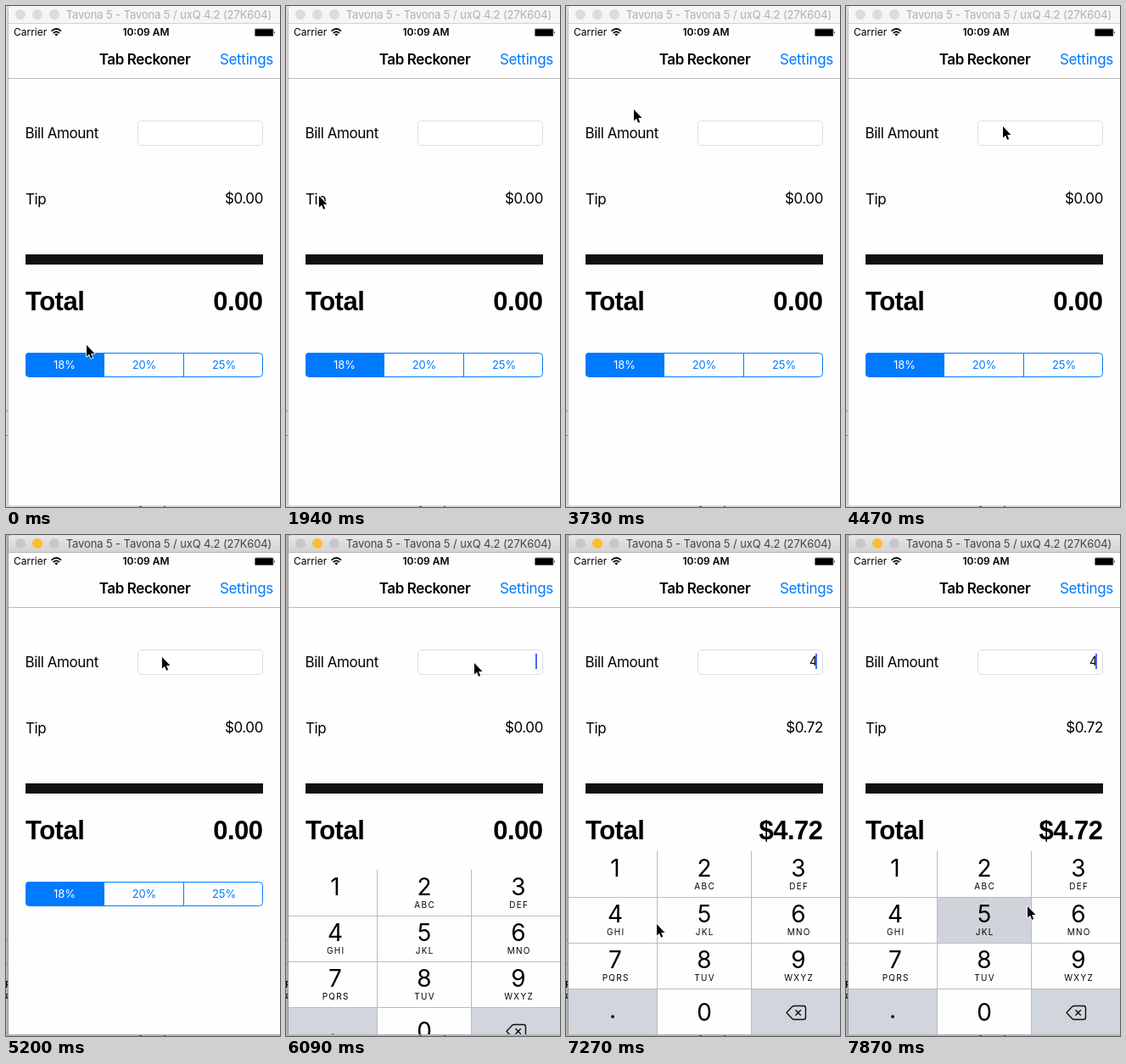
Animation of 323 by 591 pixels, one loop 8000 ms. Source, as an HTML page:

```html
<!DOCTYPE html>
<html lang="en">
<head>
<meta charset="utf-8">
<title>Bill splitter</title>
<style>
  html, body { margin: 0; width: 100%; height: 100%; overflow: hidden; background: #fefefe; }
  svg { display: block; width: 323px; height: 591px; }
  text { font-family: Inter, "Open Sans", sans-serif; fill: #000; white-space: pre; }
  .body { font-size: 17px; letter-spacing: -.4px; }
  .bold { font-weight: 600; }
  .small { font-size: 12px; }
  .total { font: bold 31px "Liberation Sans", Arial, sans-serif; letter-spacing: -.5px; }
  .seg { font-size: 13px; letter-spacing: -.1px; fill: #007aff; }
  .digit { font-size: 28px; }
  .abc { font-size: 10px; letter-spacing: 1.3px; }
  .mid { text-anchor: middle; }
  .end { text-anchor: end; }
  .blue { fill: #007aff; }
</style>
</head>
<body>
<svg viewBox="0 0 323 591">
  <defs>
    <linearGradient id="bar" x1="0" y1="0" x2="0" y2="1">
      <stop offset="0" stop-color="#e8e6e8"/>
      <stop offset="1" stop-color="#d3d1d3"/>
    </linearGradient>
    <clipPath id="screen"><rect x="3" y="21" width="320" height="568"/></clipPath>
    <clipPath id="strip"><rect width="3" height="591"/></clipPath>
  </defs>

  <!-- desktop behind the window -->
  <rect id="desk" width="323" height="591"/>
  <path d="M0 477.5H3M0 506.5H3" stroke="#8c8c8c"/>
  <path d="M157 590.5h3M186 590.5h2" stroke="#555"/>
  <g id="behind" clip-path="url(#strip)">
    <text class="bold" font-size="11" x="-1" y="534">F</text>
    <text class="bold" font-size="11" x="-1" y="547">a</text>
  </g>
  <path id="edge" d="M2.5 4V589"/>

  <!-- window -->
  <path id="head" d="M3 21V4Q3 0 7 0H323V21Z"/>
  <path id="rule" d="M3 20.5H323"/>
  <g id="lights">
    <circle cx="17" cy="10" r="6"/>
    <circle id="amber" cx="37" cy="10" r="6"/>
    <circle cx="57" cy="10" r="6"/>
  </g>
  <text id="caption" class="mid" x="192" y="15" font-size="13" letter-spacing="-.11">Tavona 5 - Tavona 5 / uxQ 4.2 (27K604)</text>
  <rect x="3" y="21" width="320" height="568" fill="#fefefe"/>

  <!-- status and navigation bars -->
  <text class="small" x="9" y="35">Carrier</text>
  <g fill="none" stroke="#000" stroke-width="1.7">
    <path d="M53.6 29.6Q59.3 24.4 65 29.6M55.7 32Q59.3 28.8 62.9 32"/>
    <path d="M59.3 35.6L57.3 33.4Q59.3 31.8 61.3 33.4Z" fill="#000" stroke="none"/>
  </g>
  <text class="small bold mid" x="165" y="35">10:09 AM</text>
  <rect x="293" y="26.5" width="22.5" height="9.5" rx="1.5" fill="#777"/>
  <rect x="294" y="27.5" width="20.5" height="7.5" rx=".5"/>
  <path d="M316.3 29.6q1.8 1.7 0 3.400z"/>
  <text class="body bold mid" x="163.5" y="69">Tab Reckoner</text>
  <text class="body blue end" x="315" y="69" style="letter-spacing:-.3px">Settings</text>
  <path d="M3 85.5H323" stroke="#bcbcbc"/>

  <!-- form -->
  <text class="body" x="22.5" y="155.5">Bill Amount</text>
  <rect x="155.5" y="135.5" width="147" height="29" rx="4.5" fill="#fff" stroke="#dedede"/>
  <text id="bill" class="end" x="296" y="154" font-size="14">4</text>
  <rect id="caret" x="294" y="140" width="2" height="18" fill="#426bf2"/>
  <text class="body" x="23" y="234">Tip</text>
  <text id="tip" class="body end" x="303" y="233"></text>
  <rect x="23" y="293" width="280" height="12" fill="#111"/>
  <text class="total" x="23" y="359">Total</text>
  <text id="total" class="total end" x="302.5" y="359"></text>

  <!-- rate picker -->
  <path d="M116 409H27q-4 0-4 4v20.5q0 4 4 4H116z" fill="#007aff"/>
  <rect x="23.5" y="409.5" width="279" height="28" rx="4" fill="none" stroke="#007aff"/>
  <path d="M209.5 409.5V437.5" stroke="#007aff"/>
  <text class="seg mid" x="69" y="428" style="fill:#fff">18%</text>
  <text class="seg mid" x="163" y="428">20%</text>
  <text class="seg mid" x="257" y="428">25%</text>

  <g clip-path="url(#screen)"><g id="pad"></g></g>

  <path id="cursor" d="M0 0V13.6L3.1 10.8 5.1 15.8 7.2 14.9 5.1 10H9.5Z"
    fill="#000" stroke="#fff" stroke-width="1.6" stroke-linejoin="round" paint-order="stroke"/>
</svg>
<script>
const LOOP = 8000, TICK = 148.5;
const $ = id => document.getElementById(id);
const show = (id, on) => $(id).setAttribute('visibility', on ? 'visible' : 'hidden');
const set = (id, name, value) => $(id).setAttribute(name, value);

// Number pad
const colX = [3, 108, 219, 323], midX = [58, 163, 274], top0 = 373, rowH = 54;
const groups = ['', 'ABC', 'DEF', 'GHI', 'JKL', 'MNO', 'PQRS', 'TUV', 'WXYZ'];
const text = (cls, x, y, s) => `<text class="${cls} mid" x="${x}" y="${y}">${s}</text>`;
const key = (i, fill) => {
  const c = i % 3, y = top0 + Math.floor(i / 3) * rowH;
  return `<rect id="key${i + 1}" x="${colX[c]}" y="${y}" width="${colX[c + 1] - colX[c]}" height="${rowH}" fill="${fill}"/>`;
};

function buildPad() {
  let out = '';
  for (let i = 0; i < 12; i++) out += key(i, i === 9 || i === 11 ? '#d1d5dc' : '#fefefe');
  out += '<path d="M107.5 373V589M218.5 373V589M3 427.5H323M3 481.5H323M3 535.5H323" stroke="#b9bbbf"/>';
  groups.forEach((letters, i) => {
    const x = midX[i % 3], y = top0 + Math.floor(i / 3) * rowH;
    out += text('digit', x, y + 30, i + 1) + text('abc', x + .7, y + 45, letters);
  });
  out += text('digit', 55, 570, '.') + text('digit', midX[1], 573, 0);
  out += `<path d="M260 563.5L266.5 556.5Q267.5 555.5 269 555.5H280Q282.5 555.5 282.5 558V569
    Q282.5 571.5 280 571.5H269Q267.5 571.5 266.5 570.5ZM270.5 560.3l6.4 6.4m0-6.4l-6.4 6.4"
    fill="none" stroke="#111" stroke-width="1.4" stroke-linejoin="round"/>`;
  $('pad').innerHTML = out;
}

// Pointer path: [tick, x, y]
const path = [
  [0, 94, 400], [1, 0, 414], [13, 38, 224], [15, 38, 224], [17, 88, 196], [19, 130, 160],
  [21, 130, 160], [22, 112, 152], [24, 65, 129], [26, 92, 114], [29, 176, 138], [30, 184, 142],
  [34, 184, 142], [35, 183, 144], [38, 183, 144], [41, 221, 151], [43, 166, 263],
  [45, 102, 400], [46, 88, 440], [47, 85, 452], [49, 106, 459], [51, 168, 452], [53, 213, 438]
];

function pointer(n) {
  let i = 0;
  while (i < path.length - 2 && path[i + 1][0] <= n) i++;
  const [a, ax, ay] = path[i], [b, bx, by] = path[i + 1];
  const k = Math.min(1, (n - a) / (b - a));
  return [ax + (bx - ax) * k, ay + (by - ay) * k];
}

// Remaining travel of the pad, critically damped
function padOffset(n) {
  if (n < 38.5) return 218;
  const u = 1.5 * (n - 38.5);
  return Math.max(0, 218 * (1 + u) * Math.exp(-u) - 2);
}

function draw(t) {
  const n = Math.floor((t + 10) / TICK);   // the screen refreshes once per tick
  const active = n >= 31, typed = n >= 49;

  set('desk', 'fill', active ? '#b4b4b4' : '#d9d9d9');
  set('edge', 'stroke', active ? '#969696' : '#bdbdbd');
  set('head', 'fill', active ? 'url(#bar)' : '#f6f6f6');
  set('rule', 'stroke', active ? '#b6b4b6' : '#d1d1d1');
  set('lights', 'fill', active ? '#c9c7c9' : '#dcdcdc');
  set('amber', 'fill', active ? '#fdbd2f' : '#dcdcdc');
  $('caption').style.fill = active ? '#464646' : '#b0b0b0';
  show('behind', n >= 34);

  const bill = typed ? 4 : 0, tip = bill * .18;
  show('bill', typed);
  show('caret', n >= 39 && !(n >= 45 && n < 48));
  $('tip').textContent = '$' + tip.toFixed(2);
  $('total').textContent = (typed ? '$' : '') + (bill + tip).toFixed(2);

  set('pad', 'transform', `translate(0 ${Math.round(padOffset(n))})`);
  show('pad', n >= 39);
  set('key4', 'fill', n === 47 || n === 48 ? '#cfd4db' : '#fefefe');
  set('key5', 'fill', n >= 53 ? '#cfd4db' : '#fefefe');

  const [x, y] = pointer(n);
  set('cursor', 'transform', `translate(${Math.round(x) + 1} ${Math.round(y)})`);
  show('cursor', n < 2 || n >= 13);
}

buildPad();
const start = performance.now();
function loop() {
  draw((performance.now() - start) % LOOP);
  requestAnimationFrame(loop);
}
loop();
</script>
</body>
</html>
```
